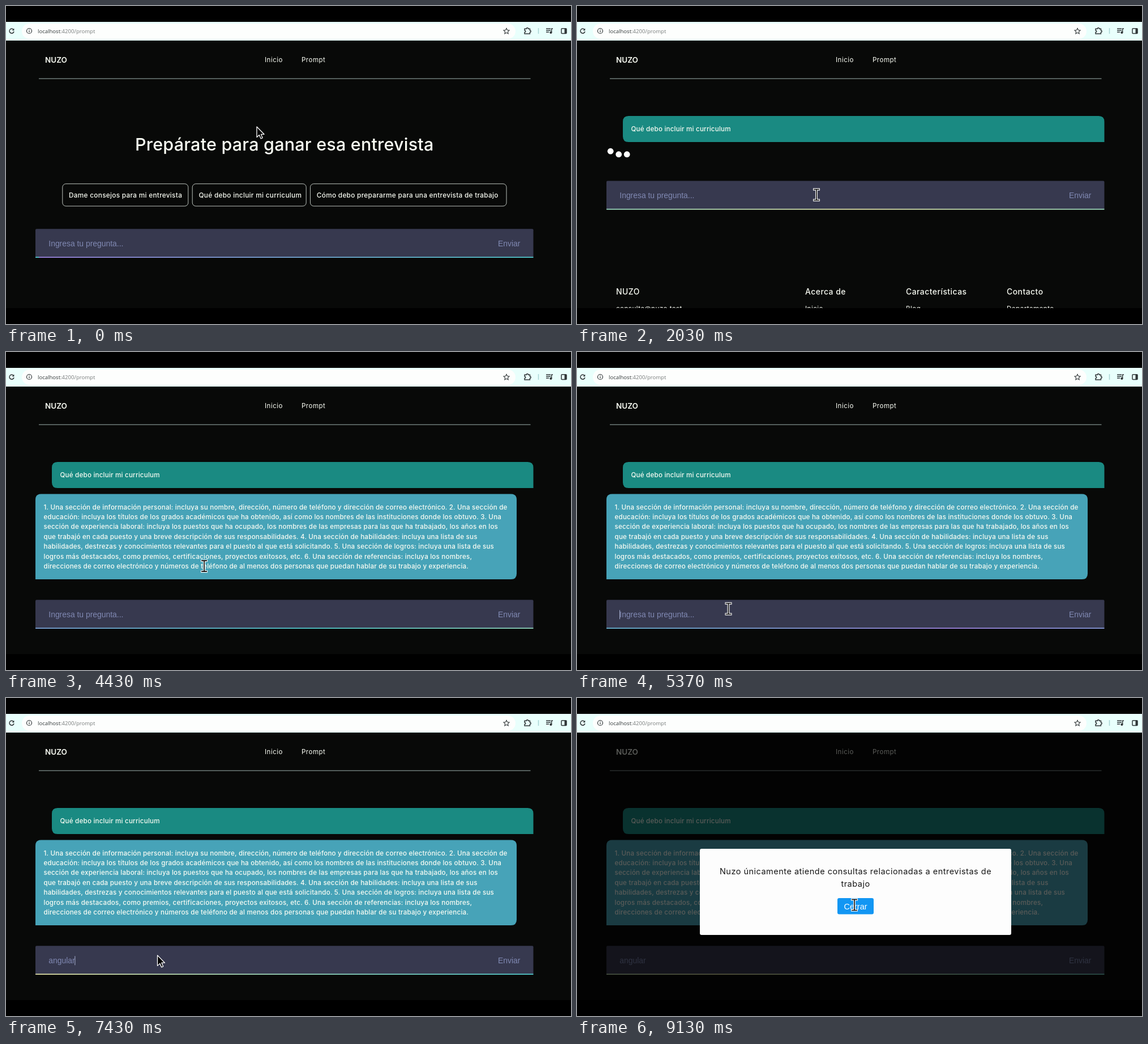
An HTML page that plays this animation: 998 by 561 pixels, repeating every 9160 ms.

```html
<!DOCTYPE html>
<html lang="es">
<head>
<meta charset="utf-8">
<title>Prompt</title>
<style>
  html, body { margin: 0; width: 100%; height: 100%; overflow: hidden; background: #000; }
  svg { display: block; width: 100vw; height: 100vh; }
  text { font: 400 11.6px Inter, "Noto Sans", sans-serif; letter-spacing: .04em; fill: #fafdf4; }
  .medium { font-weight: 500; letter-spacing: .018em; }
  .option { font-size: 11.8px; font-weight: 500; letter-spacing: .025em; }
  .brand { font-size: 13.5px; font-weight: 600; letter-spacing: 0; }
  .heading { font-size: 13.9px; font-weight: 500; letter-spacing: .035em; }
  .title { font-size: 30.5px; font-weight: 500; letter-spacing: .007em; }
  .notice { font-size: 14.5px; letter-spacing: .034em; fill: #161616; text-anchor: middle; }
  .field { font: 13.9px "Liberation Sans", Arial, sans-serif; letter-spacing: 0; fill: #8089b3; }
  .close { font: 14.5px "Liberation Sans", Arial, sans-serif; letter-spacing: 0; fill: #fff; text-anchor: middle; }
  .url { font: 9.55px "Open Sans", "Noto Sans", sans-serif; letter-spacing: 0; fill: #777b7b; }
  .icon { fill: none; stroke: #303638; stroke-width: 1.5; }
  .chip { fill: none; stroke: #e9f2ea; stroke-width: .8; }
</style>
</head>
<body>
<svg id="stage" viewBox="0 0 998 561" preserveAspectRatio="none"></svg>
<script>
const LOOP = 9160;
const SENT = 1900, ANSWERED = 3730, FOCUSED = 5200, SUBMITTED = 7250, NOTICE = 7900;
const BAR_X = 52, BAR_W = 879.5;

const label = (x, y, s, cls = '') => `<text x="${x}" y="${y}" class="${cls}">${s}</text>`;
const box = (x, y, w, h, r, attrs) =>
  `<rect x="${x}" y="${y}" width="${w}" height="${h}" rx="${r}" ${attrs}/>`;

const chips = [
  [99.8, 222, 111, 'Dame consejos para mi entrevista'],
  [329.2, 201, 340.5, 'Qué debo incluir mi curriculum'],
  [537.5, 346.5, 548.8, 'Cómo debo prepararme para una entrevista de trabajo']
];
const answer = [
  '1. Una sección de información personal: incluya su nombre, dirección, número de teléfono y dirección de correo electrónico. 2. Una sección de',
  'educación: incluya los títulos de los grados académicos que ha obtenido, así como los nombres de las instituciones donde los obtuvo. 3. Una',
  'sección de experiencia laboral: incluya los puestos que ha ocupado, los nombres de las empresas para las que ha trabajado, los años en los',
  'que trabajó en cada puesto y una breve descripción de sus responsabilidades. 4. Una sección de habilidades: incluya una lista de sus',
  'habilidades, destrezas y conocimientos relevantes para el puesto al que está solicitando. 5. Una sección de logros: incluya una lista de sus',
  'logros más destacados, como premios, certificaciones, proyectos exitosos, etc. 6. Una sección de referencias: incluya los nombres,',
  'direcciones de correo electrónico y números de teléfono de al menos dos personas que puedan hablar de su trabajo y experiencia.'
];
const footer = [
  [69, 'NUZO', 'consulta@nuzo.test'],
  [403, 'Acerca de', 'Inicio'],
  [581, 'Características', 'Blog'],
  [759, 'Contacto', 'Departamento']
];
const glow = ['#B294FF', '#57E6E6', '#FEFFB8', '#57E6E6', '#B294FF', '#57E6E6'];

const toolbar = `
  ${box(0, 28, 998, 33, 0, 'fill="#e9fffc"')}
  ${box(28, 31, 872, 27, 13.5, 'fill="#fdfefd"')}
  <g class="icon">
    <path d="M13.2 41.6A4 4 0 1 0 14 45"/><path d="M14.4 39.4V43.2H10.6Z" fill="#303638" stroke="none"/>
    <circle cx="41" cy="44" r="4.5" stroke-width="1.2"/><path d="M41 43.4V46.6M41 41.2V42.4" stroke-width="1.2"/>
    <path d="M884 39.3L885.5 42.6L889 43L886.4 45.4L887.1 48.9L884 47.1L880.9 48.9L881.6 45.4L879 43L882.5 42.6Z" stroke-width="1.1"/>
    <path d="M916 40.2H919.2A1.7 1.7 0 0 1 922.6 40.2H925.4V43A1.7 1.7 0 0 1 925.4 46.4V49H916V46.4A1.7 1.7 0 0 0 916 43Z"/>
    <path d="M940.5 39V49" stroke="#a9d5d5"/>
    <path d="M954 40H962M954 43H962M954 46H959M963.6 47V40H966"/><circle cx="962.4" cy="46.8" r="1.4" fill="#303638"/>
    <rect x="981" y="39.8" width="9" height="8.6" rx="1"/><path d="M986.5 40H990V48.4H986.5Z" fill="#303638" stroke="none"/>
  </g>
  <text x="56" y="48" class="url"><tspan fill="#33393a">localhost</tspan>:4200/prompt</text>`;

const cursors = `
  <g id="cursor" stroke-linejoin="round">
    <path id="arrow" d="M0 0V18.5L4.3 14.5L7.2 21L10.2 19.7L7.4 13.3H13Z" fill="#000" stroke="#fff" stroke-width="1.3"/>
    <g id="hand">
      <path d="M-2 0Q0 -2.4 2 0V6Q4 4.4 5.2 6.6Q7 5.4 8 7.6Q9.6 7.4 9.6 9.6V15Q9.6 18 7.6 21.5H-3.2Q-4 18 -8.4 12.4Q-9.6 9.4 -6.4 9.6L-2 13Z" fill="#000" stroke="#fff" stroke-width=".9"/>
      <path d="M2 6V10M5.2 6.6V10.4M8 7.6V11" stroke="#fff" stroke-width=".8"/>
    </g>
    <g id="beam" fill="none">
      <path d="M-6 -9.5H6M-6 9.5H6M0 -9.5V9.5" stroke="#fff" stroke-width="4"/>
      <path d="M-5 -9.5H5M-5 9.5H5M0 -9.5V9.5" stroke="#000" stroke-width="1.6"/>
    </g>
  </g>`;

document.getElementById('stage').innerHTML = `
  <defs>
    <linearGradient id="glow" gradientUnits="userSpaceOnUse" spreadMethod="repeat" y1="0" y2="0">
      ${glow.map((c, i) => `<stop offset="${i / 5}" stop-color="${c}"/>`).join('')}
    </linearGradient>
    <clipPath id="screen"><rect y="28" width="998" height="505"/></clipPath>
  </defs>
  <rect width="998" height="561"/>
  <g clip-path="url(#screen)">
    ${box(0, 28, 998, 505, 0, 'fill="#080908"')}
    ${label(69, 99.5, 'NUZO', 'brand')}
    ${label(457, 99, 'Inicio')}${label(522, 99, 'Prompt')}
    ${box(58, 127.7, 868.5, .8, 0, 'fill="#c3dcd6"')}
    <g id="home">
      ${label(228, 255, 'Prepárate para ganar esa entrevista', 'title')}
      ${chips.map(([x, w, tx, s], i) => `<g id="chip${i}">${box(x, 313.7, w, 39.3, 6, 'class="chip"')}${label(tx, 338, s, 'option')}</g>`).join('')}
    </g>
    <g id="chat">
      <path d="M91 194H921.5Q931.5 194 931.5 204V240H91Q81 240 81 230V204Q81 194 91 194Z" fill="#1a8a82"/>
      ${label(95.5, 221, chips[1][3], 'medium')}
    </g>
    <g id="waiting">
      ${[0, 1, 2].map(i => `<circle id="dot${i}" cx="${59.2 + i * 14.5}" r="5.4" fill="#fff"/>`).join('')}
      ${footer.map(([x, a, b]) => label(x, 509, a, 'heading') + label(x, 538, b)).join('')}
    </g>
    <g id="answer">
      <path d="M62 250.5H892Q902 250.5 902 260.5V391Q902 401 892 401H52V260.5Q52 250.5 62 250.5Z" fill="#47a3b8"/>
      ${answer.map((s, i) => label(66.5, 277.5 + i * 17.4, s, 'medium')).join('')}
    </g>
    <g id="bar">
      ${box(BAR_X, 0, BAR_W, 50.8, 2, 'fill="#37394f"')}
      ${box(BAR_X, 49.3, BAR_W, 1.5, 0, 'fill="url(#glow)"')}
      <text id="entry" x="75.3" y="30.5" class="field"></text>
      ${label(869, 30.5, 'Enviar', 'field')}
      <rect id="caret" y="18" width="1" height="16" fill="#aab3d4"/>
    </g>
    <g id="modal">
      ${box(0, 61, 998, 472, 0, 'fill="#000" opacity=".64"')}
      ${box(217, 266, 550, 152, 3, 'fill="#fdfdfd"')}
      ${label(492, 310.5, 'Nuzo únicamente atiende consultas relacionadas a entrevistas de', 'notice')}
      ${label(492, 332.5, 'trabajo', 'notice')}
      ${box(460, 353, 64, 28.5, 3, 'fill="#1296f3"')}
      ${label(492, 372.5, 'Cerrar', 'close')}
    </g>
    ${toolbar}
    ${cursors}
  </g>`;

const el = id => document.getElementById(id);
const show = (id, on) => el(id).setAttribute('display', on ? 'inline' : 'none');
const smooth = k => k * k * (3 - 2 * k);

// Keys are [time, ...values]; returns the values at time t.
function track(keys, t, ease = k => k) {
  const i = Math.max(1, keys.findIndex(k => k[0] > t));
  const a = keys[i - 1], b = keys[i];
  const k = ease((t - a[0]) / (b[0] - a[0]));
  return a.slice(1).map((v, j) => v + (b[j + 1] - v) * k);
}

const mouse = [
  [0, 443, 213], [250, 443, 213], [850, 426.5, 331], [1170, 426.5, 331], [1850, 423, 333],
  [2100, 423, 333], [3500, 399, 333], [4100, 399, 333], [4900, 267.5, 453],
  [8100, 267.5, 454], [8800, 490, 365], [LOOP, 490, 365]
];
// Travel of the underline gradient, in bar widths.
const flow = [
  [0, 0], [1170, 8.5], [2030, 13.5], [3700, 29], [5370, 41.69], [7430, 58], [LOOP, 73.5]
];

// Linear hop: up until 30% of the cycle, down until 60%, then rest.
function hop(t) {
  const period = 875, p = (((t % period) + period) % period) / period;
  return Math.max(0, 1 - Math.abs(p - .3) / .3) * 11;
}

function render(t) {
  const [mx, my] = track(mouse, t, smooth);
  const chatting = t >= SENT, answered = t >= ANSWERED;

  show('home', !chatting);
  show('chat', chatting);
  show('waiting', chatting && !answered);
  show('answer', answered);
  show('modal', t >= NOTICE);

  const hover = !chatting && my >= 313;
  const [chipBox, chipText] = el('chip1').children;
  chipBox.style.fill = hover ? '#fdfdfd' : 'none';
  chipText.style.fill = hover ? '#161616' : '';

  for (let i = 0; i < 3; i++) el('dot' + i).setAttribute('cy', 261.7 - hop(t - SENT - i * 136));

  el('bar').setAttribute('transform', `translate(0 ${answered ? 437.3 : chatting ? 308.5 : 393.3})`);
  const x = BAR_X + track(flow, t)[0] * BAR_W;
  el('glow').setAttribute('x1', x);
  el('glow').setAttribute('x2', x + 5 * BAR_W);

  const typed = 'angular'.slice(0, Math.max(0, Math.floor((t - 5700) / 180)));
  const entry = el('entry');
  entry.textContent = typed || 'Ingresa tu pregunta...';
  const blink = (t - (t < 7000 ? FOCUSED : 7200)) % 707 < 354;
  const typing = typed.length > 0 && t < 7000;
  show('caret', t >= FOCUSED && t < NOTICE && (typing || blink));
  el('caret').setAttribute('x', 75 + (typed ? entry.getComputedTextLength() : 0));

  const shape = !chatting ? (hover ? 'hand' : 'arrow')
    : t >= SUBMITTED && t < 8500 ? 'arrow' : 'beam';
  for (const id of ['arrow', 'hand', 'beam']) show(id, id === shape);
  el('cursor').setAttribute('transform', `translate(${mx} ${my})`);
}

const start = performance.now();
function tick() {
  render((performance.now() - start) % LOOP);
  requestAnimationFrame(tick);
}
tick();
</script>
</body>
</html>
```
